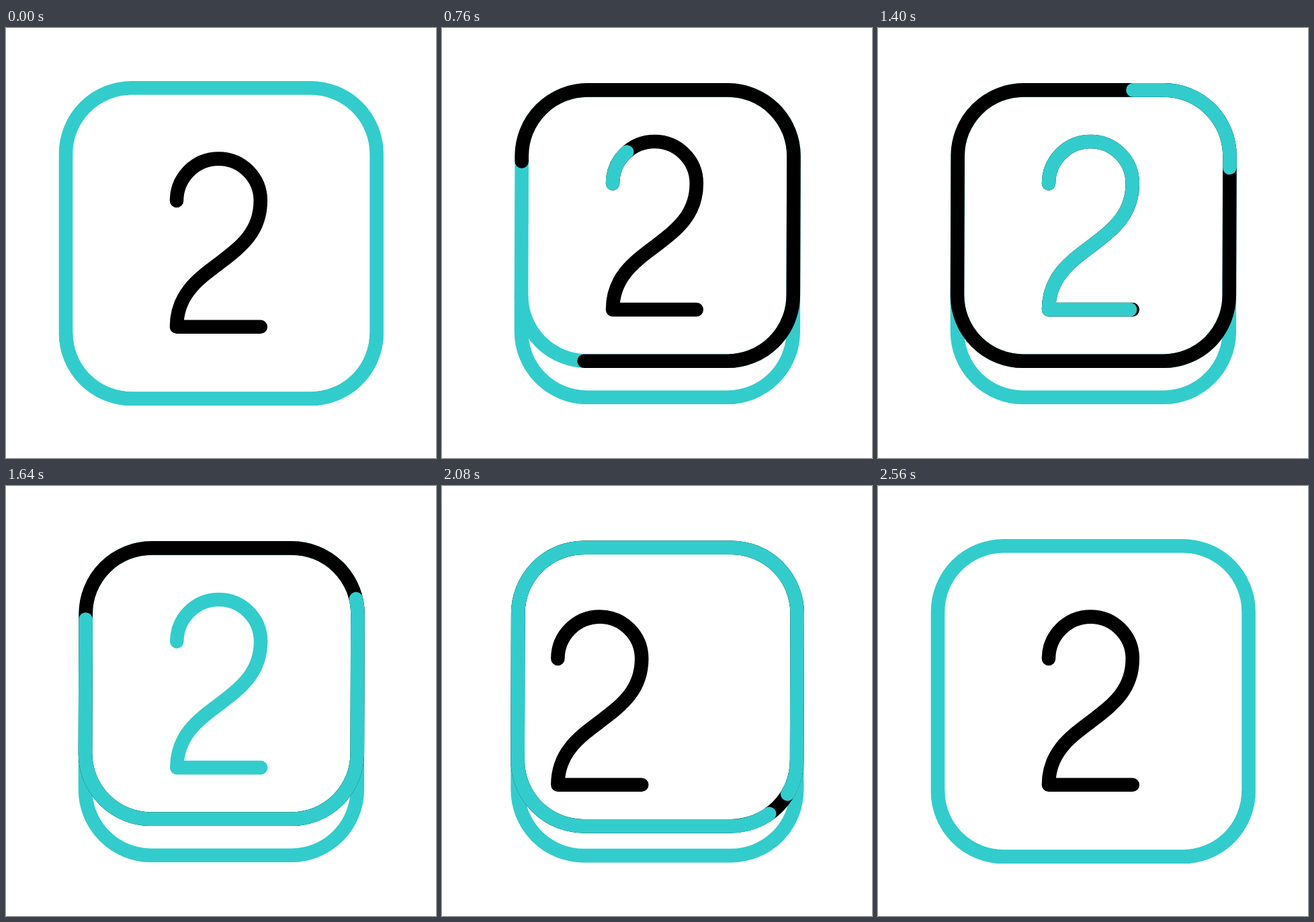
Write an HTML page that moves like this. It is 640 px wide and 640 px high and loops after 2.8 s.

```html
<!DOCTYPE html>
<html lang="en">
<head>
<meta charset="utf-8">
<title>Key two</title>
<style>
  html, body { margin: 0; width: 100%; height: 100%; overflow: hidden; background: #fff; }
  svg { display: block; width: 100vw; height: 100vh; }
  path { fill: none; stroke-width: 20.6; stroke-linecap: round; stroke-linejoin: round; }
  .teal { stroke: #33cccc; }
  .black { stroke: #000; }
  #base { stroke-linecap: butt; }
</style>
</head>
<body>
<svg viewBox="0 0 640 640">
  <defs>
    <clipPath id="face"><path id="faceShape"/></clipPath>
    <path id="two" d="M254 257A62.4 62.4 0 0 1 378.8 257C378.8 304 349 326 316.4 351C284 375 254 398 254 444.7H378.8"/>
  </defs>
  <path id="base" class="teal"/>
  <g clip-path="url(#face)">
    <g id="leaving">
      <use id="ink" href="#two" class="black"/>
      <path id="paint" class="teal" pathLength="1"/>
    </g>
    <use id="entering" href="#two" class="black"/>
  </g>
  <path id="ring" class="teal"/>
  <path id="blackRing" class="black" pathLength="1"/>
  <path id="tealRing" class="teal" pathLength="1"/>
</svg>
<script>
const LOOP = 2800, STEP = 40, R = 98, SLIDE = 380;
const $ = id => document.getElementById(id);
const mix = (a, b, k) => a + (b - a) * k;
const show = (el, on) => el.setAttribute('visibility', on ? 'visible' : 'hidden');

// Ease with flat ends; a and b are the horizontal handles.
function ease(t, start, length, a = 1 / 3, b = 2 / 3) {
  const x = (t - start) / length;
  if (x <= 0) return 0;
  if (x >= 1) return 1;
  let lo = 0, hi = 1;
  for (let i = 0; i < 24; i++) {
    const s = (lo + hi) / 2, r = 1 - s;
    if (3 * r * r * s * a + 3 * r * s * s * b + s * s * s < x) lo = s; else hi = s;
  }
  return lo * lo * (3 - 2 * lo);
}

function ringPath(p) {
  const top = mix(89.2, 92.4, p), bottom = mix(551.8, 495.8, p);
  const lt = mix(89, 118.7, p), lb = mix(89, 118, p);
  const rt = mix(551.6, 523.5, p), rb = mix(551.6, 522.8, p);
  const arc = (x, y) => `A${R} ${R} 0 0 1 ${x} ${y}`;
  return `M${lb} ${bottom - R}L${lt} ${top + R}${arc(lt + R, top)}H${rt - R}${arc(rt, top + R)}` +
    `L${rb} ${bottom - R}${arc(rb - R, bottom)}H${lb + R}${arc(lb, bottom - R)}Z`;
}

function basePath(p) {
  const l = mix(89, 118, p), r = mix(551.6, 522.8, p);
  const bottom = mix(551.8, 549.7, p), side = mix(551.8, 495.8, p) - R;
  return `M${l} ${side}V${bottom - R}A${R} ${R} 0 0 0 ${l + R} ${bottom}` +
    `H${r - R}A${R} ${R} 0 0 0 ${r} ${bottom - R}V${side}`;
}

function trim(el, tail, len) {
  show(el, len > 0);
  el.setAttribute('stroke-dasharray', len < 1 ? `${len} ${1 - len}` : 'none');
  el.setAttribute('stroke-dashoffset', -tail);
}

function draw(t) {
  const p = ease(t, 60, 650) - ease(t, 1970, 400);
  const shape = ringPath(p);
  for (const id of ['ring', 'blackRing', 'tealRing', 'faceShape']) $(id).setAttribute('d', shape);
  $('base').setAttribute('d', basePath(p));

  const tealLen = ease(t, 1200, 1120, 1 / 3, 0.18);
  const blackLen = tealLen < 1 ? ease(t, 235, 1130, 1 / 3, 0.18) : 0;
  trim($('blackRing'), 0.045 + 0.00029 * (t - 440), blackLen);
  trim($('tealRing'), 0.362 + 0.00051 * (t - 1400), tealLen < 1 ? tealLen : 0);

  const painted = ease(t, 600, 840), slide = ease(t, 1630, 642);
  const lift = -25.6 * ease(t, 60, 650);
  $('leaving').setAttribute('transform', `translate(${SLIDE * slide} ${lift})`);
  $('entering').setAttribute('transform', `translate(${SLIDE * (slide - 1)} 0)`);
  show($('ink'), painted < 1);
  show($('paint'), painted > 0 && slide < 1);
  $('paint').setAttribute('stroke-dasharray', painted < 1 ? `${painted} 2` : 'none');
  show($('entering'), slide > 0);
}

$('paint').setAttribute('d', $('two').getAttribute('d'));
const begin = performance.now();
function tick() {
  const t = (performance.now() - begin) % LOOP;
  draw(Math.floor(t / STEP) * STEP);
  requestAnimationFrame(tick);
}
tick();
</script>
</body>
</html>
```
